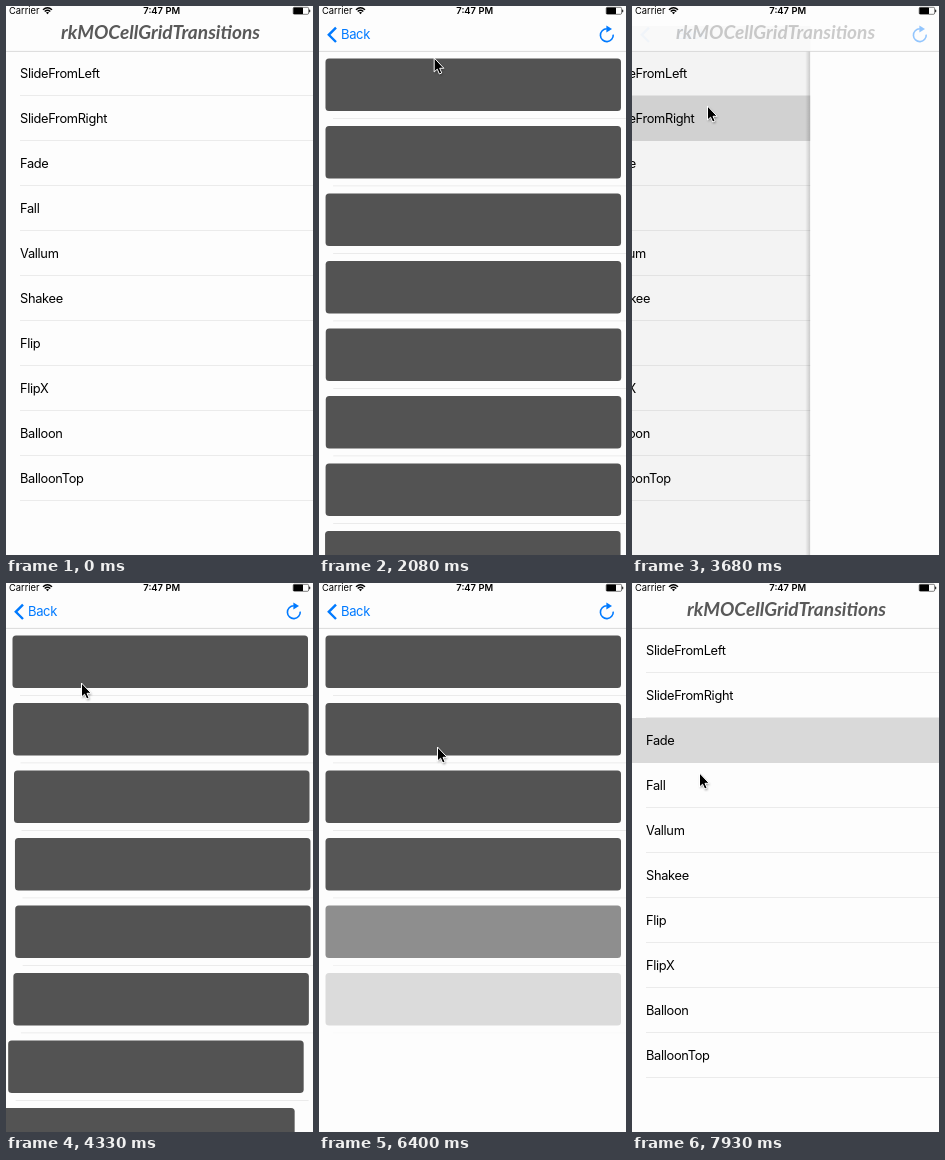
Write an HTML page that moves like this. It is 307 px wide and 549 px high and loops after 7990 ms.

```html
<!DOCTYPE html>
<html lang="en">
<head>
<meta charset="utf-8">
<title>Table animations</title>
<style>
  html, body { margin: 0; width: 100%; height: 100%; overflow: hidden; background: #fdfdfd; }
  svg { display: block; width: 100vw; height: 100vh; }
  text { font-family: Inter, sans-serif; }
  .row { font-size: 12.8px; letter-spacing: -.3px; }
  .title { font: italic 700 19.1px Lato, sans-serif; fill: #595959; text-anchor: middle; }
  .back { font-size: 13px; letter-spacing: -.35px; fill: #007aff; }
  .status { font-size: 9.3px; }
  .clock { font-size: 9.4px; font-weight: 600; text-anchor: middle; }
  .line { fill: #e8e8e8; }
  .blue { fill: none; stroke: #007aff; }
</style>
</head>
<body>
<svg viewBox="0 0 307 549">
  <defs>
    <clipPath id="page"><rect width="307" height="549"/></clipPath>
    <linearGradient id="edge">
      <stop offset="0" stop-color="#000" stop-opacity="0"/>
      <stop offset="1" stop-color="#000" stop-opacity=".17"/>
    </linearGradient>
    <filter id="soft" x="-50%" y="-50%" width="200%" height="200%">
      <feGaussianBlur stdDeviation="1"/>
    </filter>
  </defs>
  <rect width="307" height="549" fill="#fdfdfd"/>

  <g id="list">
    <g id="lines"></g>
    <rect id="mark" width="307" height="45" fill="#d9d9d9"/>
    <g id="labels"></g>
  </g>
  <rect id="dim" y="20" width="307" height="529"/>

  <g id="detail">
    <rect id="shade" x="-5" y="45" width="5" height="504" fill="url(#edge)"/>
    <g clip-path="url(#page)">
      <rect y="20" width="307" height="529" fill="#fdfdfd"/>
      <g id="cells"></g>
    </g>
  </g>

  <rect width="307" height="45" fill="#fdfdfd" opacity=".6"/>
  <rect y="44.9" width="307" height=".8" fill="#d2d2d2"/>
  <text id="title" class="title" x="154.5" y="33">rkMOCellGridTransitions</text>
  <g id="back">
    <path class="blue" d="M17 21.6L9.8 28.8L17 36" stroke-width="2.4"/>
    <text id="backText" class="back" x="22" y="33.4">Back</text>
  </g>
  <g id="reload">
    <path class="blue" d="M294.2 28.6A6.4 6.4 0 1 1 287.8 22.8" stroke-width="1.6"/>
    <path d="M287.4 19.4L293 22.9L287.4 26.4Z" fill="#007aff"/>
  </g>

  <text class="status" x="3" y="8">Carrier</text>
  <path d="M37 3.7Q41.5 -.3 46 3.7M38.7 5.5Q41.5 3 44.3 5.5" fill="none" stroke="#000" stroke-width="1.4"/>
  <path d="M41.5 8.3L39.9 6.6Q41.5 5.3 43.1 6.6Z"/>
  <text class="clock" x="155.7" y="8">7:47 PM</text>
  <rect x="287.2" y="1.3" width="15.4" height="7" rx="1.2" fill="none" stroke="#000" stroke-width=".5"/>
  <rect x="287.4" y="1.5" width="9.6" height="6.6" rx=".6"/>
  <rect x="303.2" y="3.4" width="1" height="2.8" rx=".5"/>

  <g id="cursor">
    <path d="M0 0V14L3.1 11.2L5.2 16L7.6 15L5.5 10.3H9.7Z" transform="translate(.8 1.6)" opacity=".4" filter="url(#soft)"/>
    <path d="M0 0V14L3.1 11.2L5.2 16L7.6 15L5.5 10.3H9.7Z" stroke="#fff" stroke-width="1"/>
  </g>
</svg>
<script>
const LOOP = 7990, W = 307, CELLS = 8;
const NS = 'http://www.w3.org/2000/svg';
const $ = id => document.getElementById(id);
const clamp = v => Math.max(0, Math.min(1, v));

const rows = ['SlideFromLeft', 'SlideFromRight', 'Fade', 'Fall', 'Vallum',
  'Shakee', 'Flip', 'FlipX', 'Balloon', 'BalloonTop'];

// tap: row pressed, push / pop: page change begins, run: first cell starts
const visits = [
  { row: 0, tap: 1120, push: 1153, run: 1317, pop: 2620, move: fromSide(-1) },
  { row: 1, tap: 3570, push: 3602.5, run: 3800, pop: 4920, move: fromSide(1) },
  { row: 2, tap: 5810, push: 5843, run: 6047, pop: 7290, move: fadeIn }
];

// time, x, y of the pointer tip
const path = [
  [290, 272, 18], [700, 185, 74], [1880, 185, 74], [2080, 115.5, 52],
  [2300, 44, 43], [3000, 44, 43], [3340, 75.5, 100], [4340, 75.5, 100],
  [4660, 42, 44], [5160, 42, 44], [5500, 118.5, 164], [6570, 118.5, 164],
  [7030, 38, 27], [7560, 38, 27], [7920, 67.5, 190]
];

function add(parent, tag, attrs, text) {
  const el = document.createElementNS(NS, tag);
  for (const k in attrs) el.setAttribute(k, attrs[k]);
  if (text) el.textContent = text;
  return parent.appendChild(el);
}

rows.forEach((name, i) => {
  add($('lines'), 'rect', { class: 'line', x: 14, y: 89.1 + 45 * i, width: W - 14, height: .8 });
  add($('labels'), 'text', { class: 'row', x: 14, y: 72 + 45 * i }, name);
});

const cells = Array.from({ length: CELLS }, (_, i) => {
  const g = add($('cells'), 'g', {}), top = 45 + 67.5 * i;
  add(g, 'rect', { x: 6.5, y: top + 7.5, width: 295.5, height: 52.5, rx: 3.5, fill: '#535353' });
  add(g, 'rect', { class: 'line', x: 14, y: top + 67, width: W - 14, height: .8 });
  return g;
});

// critically damped page slide
function slide(ms) {
  const a = Math.max(0, ms) * .01826;
  return a > 10 ? 1 : 1 - (1 + a) * Math.exp(-a);
}

// remaining distance of an underdamped spring, damping ratio 0.6
function spring(a) {
  if (a <= 0) return 1;
  return a > 14 ? 0 : Math.exp(-.75 * a) * (Math.cos(a) + .75 * Math.sin(a));
}

function fromSide(dir) {
  return (ms, i) => ({ x: dir * W * spring(ms * .016 - .6 * i), alpha: 1 });
}

function fadeIn(ms, i) {
  const u = clamp((ms - 60 * i) / 190);
  return { x: 0, alpha: u * u * (3 - 2 * u) };
}

function pointer(t) {
  let i = path.length - 1;
  while (i > 0 && path[i][0] > t) i--;
  const a = path[i], b = path[i + 1] || a;
  const k = b === a ? 0 : (t - a[0]) / (b[0] - a[0]);
  return [a[1] + (b[1] - a[1]) * k, a[2] + (b[2] - a[2]) * k];
}

const shift = (el, x, y = 0) => el.setAttribute('transform', `translate(${x.toFixed(2)} ${y.toFixed(2)})`);
const fade = (el, v) => el.setAttribute('opacity', clamp(v).toFixed(3));

function draw(t) {
  const visit = visits.filter(v => t >= v.tap).pop();
  let p = 0;
  if (visit) {
    p = t < visit.pop ? slide(t - visit.push) : 1 - slide(t - visit.pop);
    $('mark').setAttribute('y', 45 + 45 * visit.row);
    cells.forEach((cell, i) => {
      const s = visit.move(t - visit.run, i);
      shift(cell, s.x);
      fade(cell, s.alpha);
    });
  }
  fade($('mark'), visit ? 1 : 0);
  shift($('list'), -.3 * W * p);
  fade($('dim'), .09 * p);
  shift($('detail'), W * (1 - p));
  fade($('detail'), p > .002 ? 1 : 0);
  fade($('shade'), 3 * Math.min(p, 1 - p));

  shift($('title'), -26 * p);
  fade($('title'), 1 - p / .6);
  fade($('back'), (p - .4) / .6);
  shift($('backText'), 40 * (1 - p));
  fade($('reload'), p);

  shift($('cursor'), ...pointer(t));
  fade($('cursor'), t >= path[0][0] ? 1 : 0);
}

const start = performance.now();
function tick() {
  draw((performance.now() - start) % LOOP);
  requestAnimationFrame(tick);
}
tick();
</script>
</body>
</html>
```
